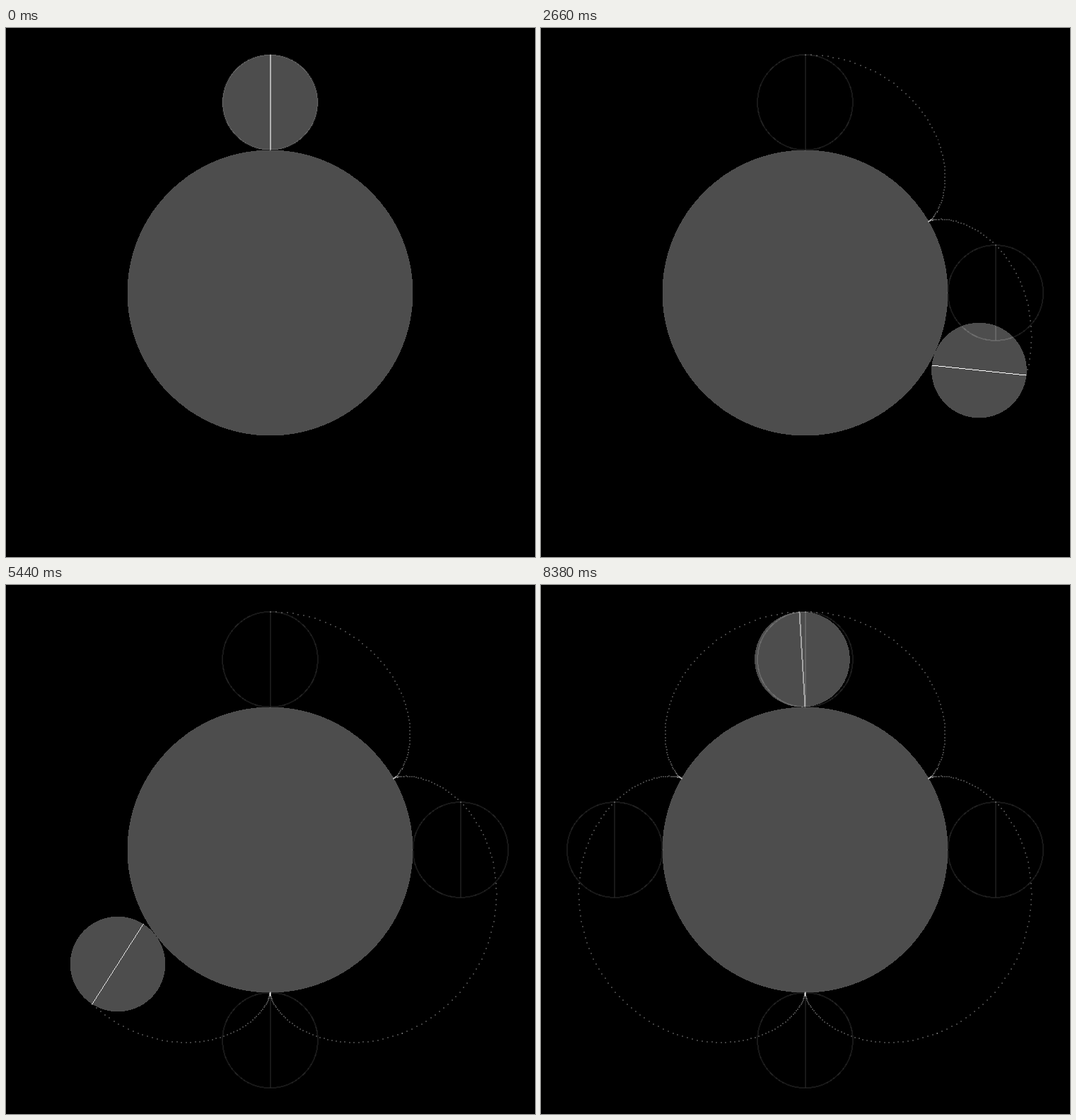
Animation, 748 px wide and 748 px high, one loop 8400 ms. Source, as an HTML page without scripts:

```html
<!DOCTYPE html>
<html lang="en">
<head>
<meta charset="utf-8">
<title>Rolling circle</title>
<style>
  /* 420 steps of 20 ms make one turn */
  @property --step {
    syntax: "<number>";
    inherits: true;
    initial-value: 0;
  }
  @keyframes roll {
    from { --step: 0; }
    to { --step: 420; }
  }
  html, body {
    margin: 0;
    width: 100%;
    height: 100%;
    overflow: hidden;
    background: #000;
  }
  svg {
    display: block;
    width: 748px;
    height: 748px;
    shape-rendering: crispEdges;
    animation: roll 8400ms steps(420) -1ms infinite;
  }
  .disc { fill: #4d4d4d; }

  .ball, .pen {
    --turn: calc(var(--step) * 360deg / 420);
    transform: translate(calc(269.28px * sin(var(--turn))), calc(-269.28px * cos(var(--turn))));
  }
  .pen line {
    --spin: calc(var(--turn) * 4);
    --s: sin(var(--spin));
    --c: cos(var(--spin));
    stroke: #fff;
    /* keeps the slanted line one pixel thick */
    stroke-width: calc(1px * max(var(--s), -1 * var(--s), var(--c), -1 * var(--c)));
    transform: rotate(var(--spin));
  }

  .ghosts {
    fill: none;
    stroke: #303030;
    mix-blend-mode: plus-lighter;
  }
  .ghosts use { opacity: calc(var(--step) - 105 * var(--q) + 1); }

  /* dot number n = a + 10b + 60c */
  .dot {
    --n: calc(var(--a) + 10 * var(--b) + 60 * var(--c));
    --t: calc(var(--n) * 360deg / 420);
    fill: #fff;
    opacity: calc(var(--step) - var(--n) + 1);
    transform: translate(
      calc(269.28px * sin(var(--t)) + 67.32px * sin(4 * var(--t))),
      calc(-269.28px * cos(var(--t)) - 67.32px * cos(4 * var(--t))));
  }
</style>
</head>
<body>
<svg viewBox="0 0 748 748">
  <defs>
    <g id="ghost">
      <circle r="67.32"/>
      <line y1="-67.32" y2="67.32"/>
    </g>
    <rect id="dot" class="dot" x="-.5" y="-.5" width="1" height="1"/>
    <g id="ten">
      <use href="#dot" style="--a:0"/>
      <use href="#dot" style="--a:1"/>
      <use href="#dot" style="--a:2"/>
      <use href="#dot" style="--a:3"/>
      <use href="#dot" style="--a:4"/>
      <use href="#dot" style="--a:5"/>
      <use href="#dot" style="--a:6"/>
      <use href="#dot" style="--a:7"/>
      <use href="#dot" style="--a:8"/>
      <use href="#dot" style="--a:9"/>
    </g>
    <g id="sixty">
      <use href="#ten" style="--b:0"/>
      <use href="#ten" style="--b:1"/>
      <use href="#ten" style="--b:2"/>
      <use href="#ten" style="--b:3"/>
      <use href="#ten" style="--b:4"/>
      <use href="#ten" style="--b:5"/>
    </g>
  </defs>

  <g transform="translate(373.5 374.5)">
    <circle class="disc" r="201.96"/>
    <circle class="disc ball" r="67.32"/>
    <g class="ghosts">
      <use href="#ghost" y="-269.28" style="--q:0"/>
      <use href="#ghost" x="269.28" style="--q:1"/>
      <use href="#ghost" y="269.28" style="--q:2"/>
      <use href="#ghost" x="-269.28" style="--q:3"/>
    </g>
    <g class="pen"><line y1="-67.32" y2="67.32"/></g>
    <g>
      <use href="#sixty" style="--c:0"/>
      <use href="#sixty" style="--c:1"/>
      <use href="#sixty" style="--c:2"/>
      <use href="#sixty" style="--c:3"/>
      <use href="#sixty" style="--c:4"/>
      <use href="#sixty" style="--c:5"/>
      <use href="#sixty" style="--c:6"/>
    </g>
  </g>
</svg>
</body>
</html>
```
